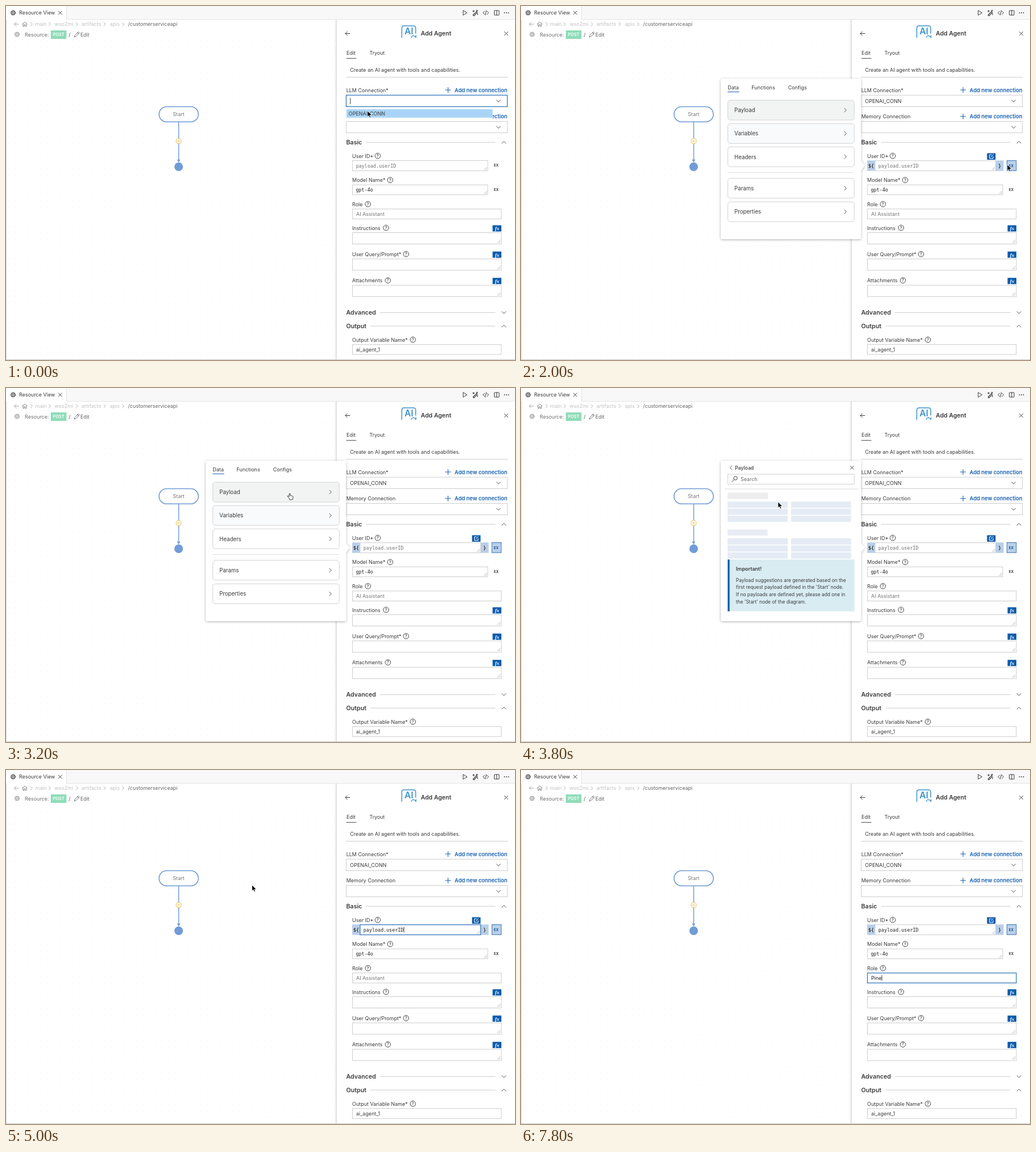
An HTML page for the animation above (8 s loop, 897 by 624 pixels).

```html
<!DOCTYPE html>
<html lang="en">
<head>
<meta charset="utf-8">
<title>Add Agent</title>
<style>
  html, body { margin: 0; width: 100%; height: 100%; overflow: hidden; background: #fff; }
  svg { display: block; width: 100%; height: 100%; }
  text { font-family: Inter, "Open Sans", sans-serif; white-space: pre; }
  .mono { font-family: "DejaVu Sans Mono", monospace; }
  .serif { font-family: "Liberation Serif", serif; font-style: italic; }
</style>
</head>
<body>
<svg id="stage" viewBox="0 0 897 624"></svg>
<script>
const LOOP = 8000, STEP = 200;
const INK = '#3b3b3b', BLUE = '#1560b0', FOCUS = '#3679bd', EDGE = '#cdcdcd', FLOW = '#719cd6';

// ---- drawing helpers: each returns markup ----
const text = (x, y, s, { size = 9, fill = INK, weight = 400, anchor = 'start', cls = '' } = {}) =>
  `<text x="${x}" y="${y}" font-size="${size}" fill="${fill}" font-weight="${weight}" text-anchor="${anchor}" class="${cls}">${s}</text>`;
const mono = (x, y, s, o = {}) => text(x, y, s, { size: 8.42, cls: 'mono', ...o });
const box = (x, y, x2, y2, fill = '#fff', stroke = 'none', r = 0, w = 1) =>
  `<rect x="${x}" y="${y}" width="${x2 - x}" height="${y2 - y}" rx="${r}" fill="${fill}" stroke="${stroke}" stroke-width="${w}"/>`;
const path = (d, stroke = INK, w = 1, fill = 'none') =>
  `<path d="${d}" stroke="${stroke}" stroke-width="${w}" fill="${fill}" stroke-linecap="round" stroke-linejoin="round"/>`;
const circle = (x, y, r, fill = 'none', stroke = INK, w = 1) =>
  `<circle cx="${x}" cy="${y}" r="${r}" fill="${fill}" stroke="${stroke}" stroke-width="${w}"/>`;
const hline = (x, x2, y, c = EDGE) => path(`M${x} ${y}H${x2}`, c);
const group = (id, body) => `<g id="${id}">${body}</g>`;

const TURN = { down: 0, left: 90, up: 180, right: 270 };
const chevron = (x, y, dir, s = 3.5, c = '#444') =>
  `<g transform="translate(${x} ${y}) rotate(${TURN[dir]})">${path(`M${-s} ${-s / 2}L0 ${s / 2}L${s} ${-s / 2}`, c, .95)}</g>`;
const cross = (x, y, s = 3, c = INK) =>
  path(`M${x - s} ${y - s}l${2 * s} ${2 * s}m0 ${-2 * s}l${-2 * s} ${2 * s}`, c, 1);
const backArrow = (x, y, c) => path(`M${x + 4} ${y}h-8m3.5 -3.5l-3.5 3.5l3.5 3.5`, c);
const gear = (x, y, c) =>
  `<circle cx="${x}" cy="${y}" r="3.8" fill="none" stroke="${c}" stroke-width="1.3" stroke-dasharray="1.8 .6"/>` +
  circle(x, y, 2.9, 'none', c, .8) + circle(x, y, 1.2, 'none', c, .9);
const pencil = (x, y, c) => path(`M${x - 4} ${y + 4}l1 -3l6 -6l2 2l-6 6zm5.5 -7.5l2 2`, c, .9);
const help = (x, y) => circle(x, y, 4.8, 'none', INK, .95) +
  text(x, y + 2.7, '?', { size: 7.5, weight: 500, anchor: 'middle' });
const grip = (x, y) => path(`M${x - 6} ${y - 1.5}l5 -5m-2 5l2 -2`, '#999', .7);
const label = (y, s, hx) => text(610, y + 3.5, s) + help(hx, y);
const exMark = (y, c = INK) => text(864, y, 'EX', { size: 6.2, weight: 700, anchor: 'middle', fill: c });
const addLink = y => path(`M774.5 ${y}h9m-4.5 -4.5v9`, BLUE, 1.1) +
  text(883.5, y + 3.5, 'Add new connection', { size: 9.4, weight: 600, fill: BLUE, anchor: 'end' });
const section = (y, s, x, dir) => text(599.5, y + 4, s, { size: 10.7, weight: 600 }) +
  hline(x, 862, y) + chevron(877.5, y, dir);
const exprField = (y, s, hx) => label(y, s, hx) +
  box(857.5, y - 4.5, 873, y + 6.5, '#0b5cad') +
  text(865.5, y + 4.2, 'fx', { size: 9, fill: '#fff', weight: 700, anchor: 'middle', cls: 'serif' }) +
  box(610.5, y + 8.5, 873, y + 28.5, '#fff', EDGE) + grip(872, y + 28);
const caret = (id, x, y) => group(id, path(`M${x} ${y - 4.5}v9`, '#222', .9));

// ---- static parts ----
function canvas() {
  const crumbs = [[51.5, 'main'], [85.5, 'wso2mi'], [133, 'artifacts'], [183, 'apis']];
  return `<defs>
    <pattern id="dots" width="11.25" height="11.25" patternUnits="userSpaceOnUse"><circle cx="5" cy="5" r=".6" fill="#e9e9e9"/></pattern>
    <linearGradient id="edge"><stop stop-color="#fff" stop-opacity="0"/><stop offset="1" stop-color="#d8d8d8"/></linearGradient>
    <filter id="shade" x="-10%" y="-10%" width="120%" height="125%"><feDropShadow dx="0" dy="1" stdDeviation="2.2" flood-opacity=".32"/></filter>
  </defs>` +
  box(0, 0, 897, 624) + box(0, 58, 582, 623, 'url(#dots)') +
  box(106, 0, 897, 23.5, '#f8f8f8') + path('M106.5 0V23.5H897', '#e4e4e4') +
  gear(12.5, 12, INK) + text(23, 15.3, 'Resource View') + cross(95.5, 12) +
  path('M806 8l6.5 4l-6.5 4z') +
  path('M823 16l6 -6l1.5 1.5l-6 6zM824 7.5v3m-1.5 -1.5h3M830 7v2.5m-1.2 -1.2h2.5M831 13v2.4', INK, 1.1) +
  path('M843.5 9l-3 3l3 3m4 -6l3 3l-3 3m-1 -7l-2 8') +
  box(860.5, 8, 869, 16, 'none', INK, .5) + path('M864.8 8v8') +
  [878.5, 882, 885.5].map(x => circle(x, 12, .9, INK, 'none')).join('') +
  backArrow(18.5, 32, '#aaa') + path('M28.5 32l4.5 -4l4.5 4m-7.5 -1v5h2v-3h2v3h2v-5', '#888') +
  [45, 77, 125, 174, 206.5].map(x => chevron(x, 32, 'right', 3, '#aaa')).join('') +
  crumbs.map(([x, s]) => text(x, 35, s, { fill: '#c2c2c2' })).join('') +
  text(215, 35, '/customerserviceapi', { fill: '#666' }) +
  gear(19.5, 50, '#999') + text(33, 54, 'Resource:', { fill: '#707070' }) +
  box(79, 43, 106.5, 58, '#8fdcb9') + text(92.8, 53.3, 'POST', { size: 7.4, weight: 600, fill: '#fff', anchor: 'middle' }) +
  text(110.5, 54, '/', { fill: '#555' }) + pencil(124.5, 50.5, '#666') + text(131, 54, 'Edit', { fill: '#666' }) +
  path('M304.4 205V272', FLOW, 1.5) + path('M302.2 271h4.4l-2.2 4z', FLOW, .8, FLOW) +
  box(269.7, 177.5, 339, 204.3, '#fff', FLOW, 13.4, 1.6) +
  text(304.3, 194, 'Start', { size: 9.1, fill: '#777', anchor: 'middle' }) +
  circle(304.4, 238, 4.6, '#fffdf4', '#e5c566', 1.1) + path('M302 238h4.8m-2.4 -2.4v4.8', '#e5c566', .8) +
  circle(304.3, 283.4, 7.6, FLOW, 'none');
}

function panel() {
  const icon = '#3a93cf';
  return box(577, 24, 583, 623, 'url(#edge)') + box(583, 24, 897, 623) +
  backArrow(602, 48.5, INK) + cross(881.5, 48.5) +
  path('M697.5 55.5V39q0 -4 4 -4H718q4 0 4 4V48', icon, 1.5) +
  text(710, 49.8, 'AI', { size: 15.5, weight: 600, fill: icon, anchor: 'middle' }) +
  path('M714.5 55.5v-1q2 -3.5 5.5 -1.5l2.5 2.5v-3.5', icon, 1.3) +
  text(731, 52.3, 'Add Agent', { size: 10.5, weight: 600 }) +
  text(600, 85.8, 'Edit') + text(640.5, 85.8, 'Tryout', { size: 8.8 }) + path('M600 92.3h17', '#444') +
  text(606.3, 116.2, 'Create an AI agent with tools and capabilities.') + hline(599.5, 884, 125.5) +
  text(599.7, 151.5, 'LLM Connection*') + addLink(148) +
  `<rect id="llm" x="599.5" y="157.2" width="284" height="20.2" fill="#fff"/>` + chevron(868, 167.5, 'down') +
  text(599.7, 198.2, 'Memory Connection') + addLink(194.7) +
  box(599.5, 203.5, 883.5, 223.5, '#fff', EDGE) + chevron(868, 213.8, 'down') +
  group('llmValue', text(606.3, 170.7, 'OPENAI_CONN')) +
  group('dropdown', path('M606.8 162.5v10', '#222', .9) + box(599, 180, 857.5, 203) +
    box(600, 182, 857.5, 196.8, '#a9d4f7') + text(603.8, 192.8, 'OPENAI_CONN')) +
  section(240.3, 'Basic', 635, 'up') +
  label(264.2, 'User ID*', 655) +
  group('plainUser', box(610.5, 272.5, 849, 290.5, '#fff', EDGE) + grip(848.5, 290.5) +
    mono(616.7, 284.6, 'payload.userID', { fill: '#707070' }) + exMark(283.3)) +
  group('exprUser', box(610, 272.3, 624, 290.7, '#b9cfe8') + box(836.5, 272.3, 850.5, 290.7, '#b9cfe8') +
    mono(612, 284.6, '${', { weight: 700 }) + mono(841, 284.6, '}', { weight: 700 }) +
    `<rect id="userBox" x="624" y="272.7" width="212.5" height="17.8" fill="#fff"/>` + grip(836, 290.5) +
    mono(629.8, 284.6, 'payload.userID', { fill: '#222' }).replace('<text', '<text id="userText"') +
    caret('userCaret', 701.3, 281.5) +
    box(856.3, 272.5, 872.8, 290.2, '#b9d0ea', '#3a74b5') + exMark(283.5, '#1c4f86') +
    box(821.3, 259.5, 836.3, 271, '#0b5cad', 'none', .8) +
    path('M829 262.2h-3.5v6.5h6.5v-3.5M828 266.2l4.3 -4.5', '#fff', 1)) +
  label(306.8, 'Model Name*', 677) + box(610.5, 315.3, 849, 332.7, '#fff', EDGE) + grip(848.5, 332.7) +
  mono(616.5, 327, 'gpt-4o', { fill: '#222' }) + exMark(325.8) +
  label(349.2, 'Role', 637.8) +
  `<rect id="roleBox" x="610.5" y="357.8" width="262.3" height="17.6" fill="#fff"/>` +
  `<text id="roleText" x="617" y="370" font-size="9"></text>` + caret('roleCaret', 0, 366.5) +
  exprField(391, 'Instructions', 669.7) + exprField(437.3, 'User Query/Prompt*', 705) +
  exprField(483.7, 'Attachments', 673) +
  section(540.4, 'Advanced', 659, 'down') + section(564.2, 'Output', 643, 'up') +
  label(588.2, 'Output Variable Name*', 717) + box(610.5, 596.7, 872.8, 614.3, '#fff', EDGE) +
  text(617, 608.8, 'ai_agent_1') + hline(0, 897, 623.4, '#c8c8c8') + path('M.4 24V623', '#d5d5d5');
}

function helper() {
  const cards = [[166, 'Payload'], [207.2, 'Variables'], [248.3, 'Headers'], [303.8, 'Params'], [345.2, 'Properties']];
  const card = ([y, s], i) =>
    box(364.5, y, 587.3, y + 35, ['#f2f3f3', '#f8fafc'][i] || '#fff', '#d2d2d2', 4.5) +
    text(376, y + 21.2, s, { size: 9.7 }) + chevron(571.7, y + 17.5, 'right', 3.3);
  const bones = y => [0, 12.4, 24.8].map(d =>
    box(364, y + d, 470, y + d + 11) + box(476, y + d, 581.5, y + d + 11)).join('').replaceAll('#fff', '#e5ebf4');
  const note = ['Payload suggestions are generated based on the', "first request payload defined in the 'Start' node.",
    'If no payloads are defined yet, please add one in', "in the 'Start' node of the diagram."];
  note[3] = note[3].slice(3);
  note[3] = 'the ' + note[3].slice(4);
  return `<g filter="url(#shade)">${box(352, 128.3, 599.3, 411, '#fff', 'none', 3)}${path('M599 273l6.5 8.5l-6.5 8.5z', 'none', 0, '#fff')}</g>` +
  group('menu', text(364.3, 146.7, 'Data') + text(406.3, 146.7, 'Functions') + text(470.7, 146.7, 'Configs') +
    path('M364.5 151.4h19.5', BLUE) + cards.map(card).join('') + hline(364, 587, 293.5, '#e0e0e0')) +
  group('payload', chevron(370, 140.5, 'left', 3.4) + text(377, 143.8, 'Payload', { size: 8.7, weight: 500 }) +
    cross(583.3, 140.5, 2.9) + box(364.5, 152, 587.3, 169.5, '#fff', '#d2d2d2') +
    circle(378, 159, 3.2, 'none', '#444') + path('M375.7 161.5l-4 4', '#444') +
    text(387, 164.2, 'Search', { size: 8.9, fill: '#666' }) + hline(359, 594, 178, '#dadada') +
    group('bones', box(364, 184.5, 435, 195.7, '#ededed') + bones(200.2) + box(364, 249.3, 434.5, 260.2, '#e8ecf4') + bones(264.9)) +
    box(364.3, 302.3, 587.5, 393.6, '#d8ecf2') + box(364.3, 302.3, 367.6, 393.6, '#0b5cad') +
    text(378.8, 321.8, 'Important!', { weight: 600 }) +
    note.map((s, i) => text(378.8, 341.6 + i * 12.65, s, { size: 8.4 })).join(''));
}

function suggest() {
  const key = (x, x2) => box(x, 321.3, x2, 334, '#fff', '#dcdcdc', 1.5, .8);
  const small = { size: 8.3 }, cap = { size: 6.9, weight: 700 };
  return `<g filter="url(#shade)">${box(623.7, 296, 870, 339.5, '#fff', 'none', 2)}</g>` +
  box(624, 298.5, 869.5, 315, '#f6f6f6') + hline(624, 869.5, 317.5, '#e2e2e2') +
  box(630, 305, 636, 310.5, 'none', '#555', .5, .8) + box(633.5, 302.5, 639, 308, '#f6f6f6', '#555', .5, .8) +
  path('M631.5 307.7h3', '#555', .8) +
  mono(644.7, 309.8, 'userID', { size: 8.9, weight: 700 }) +
  key(629, 641.5) + key(650, 662.3) + key(717.5, 746.3) + key(791, 810.8) +
  path('M635.3 330.5v-5.5m-1.6 1.6l1.6 -1.6l1.6 1.6M656.2 325v5.5m-1.6 -1.6l1.6 1.6l1.6 -1.6', '#333', .9) +
  text(644.5, 330.7, ',', small) + text(665.7, 330.7, 'to navigate.', small) + text(720, 330.2, 'ENTER', cap) +
  text(748.7, 330.7, 'to select.', small) + text(793.7, 330.2, 'ESC', cap) + text(813.8, 330.7, 'to cancel.', small) +
  box(861.5, 290.8, 871, 300, '#fff') + cross(866.3, 295.3, 2.6);
}

const pointers = group('arrow', path('M0 0V10.2L2.4 8L4 11.8L5.8 11L4.2 7.4H7.4Z', '#fff', .7, '#000')) +
  group('hand', path('M-1.2 8.2L-4 4.8q.2 -1.4 1.8 -.4L-1 5.6V.6q1 -1.2 2 0V4q1.2 -.8 1.8 .2q1.2 -.6 1.7 .4q1.3 -.2 1.3 1V8L4.5 11H.5Z', '#222', .9, '#fff'));

const stage = document.getElementById('stage');
stage.innerHTML = canvas() + panel() + group('helper', helper()) + group('suggest', suggest()) + pointers;

// ---- motion ----
const el = id => document.getElementById(id);
const ids = ['llm', 'llmValue', 'dropdown', 'plainUser', 'exprUser', 'userBox', 'userText', 'userCaret', 'roleBox',
  'roleText', 'roleCaret', 'helper', 'menu', 'payload', 'bones', 'suggest', 'arrow', 'hand'];
const ui = Object.fromEntries(ids.map(id => [id, el(id)]));

// pointer stops: time, x, y
const route = [[0, 637, 185], [200, 638, 186], [1200, 886, 263], [1600, 864, 278], [2000, 857, 280], [2200, 849, 279],
  [2400, 849, 279], [2600, 770, 250], [3000, 501, 185], [3200, 500, 186], [3800, 453, 201], [5000, 433.5, 203],
  [5200, 450, 225], [6000, 660, 376], [6400, 652, 367], [6600, 650, 368], [7000, 650, 368], [7200, 579, 382], [LOOP, 579, 382]];

function pointerAt(t) {
  const i = route.findIndex(k => k[0] > t), [t0, x0, y0] = route[i - 1], [t1, x1, y1] = route[i];
  const p = (t - t0) / (t1 - t0);
  return [x0 + (x1 - x0) * p, y0 + (y1 - y0) * p];
}

const show = (name, on) => ui[name].setAttribute('display', on ? 'inline' : 'none');
function focus(name, on) {
  ui[name].setAttribute('stroke', on ? FOCUS : EDGE);
  ui[name].setAttribute('stroke-width', on ? 1.3 : 1);
}

function render(time) {
  const t = Math.floor(time / STEP) * STEP;
  const within = (a, b = LOOP) => t >= a && t < b;

  show('dropdown', !within(400));
  show('llmValue', within(400));
  focus('llm', !within(1800));

  show('plainUser', !within(1800));
  show('exprUser', within(1800));
  const editing = within(5000, 6400);
  focus('userBox', editing);
  show('userCaret', editing);
  ui.userText.setAttribute('fill', within(5000) ? '#222' : '#707070');

  show('helper', within(2000, 5000));
  show('menu', !within(3400));
  show('payload', within(3400));
  ui.bones.setAttribute('opacity', .85 + .15 * Math.cos((t - 3800) / 1500 * 2 * Math.PI));
  show('suggest', within(5400, 6400));

  const typed = 'Pine'.slice(0, Math.max(0, (t - 7000) / STEP));
  ui.roleText.textContent = typed || 'AI Assistant';
  ui.roleText.setAttribute('fill', typed ? '#222' : '#777');
  focus('roleBox', within(6400));
  show('roleCaret', within(6400));
  const end = typed ? ui.roleText.getComputedTextLength() + .5 : 0;
  ui.roleCaret.setAttribute('transform', `translate(${617 + end} 0)`);

  const [x, y] = pointerAt(t);
  const overButton = within(1600, 2000) || within(3000, 3400);
  for (const name of ['arrow', 'hand']) ui[name].setAttribute('transform', `translate(${x} ${y})`);
  show('hand', overButton);
  show('arrow', !overButton && !within(7400));
}

const start = performance.now();
function tick(now) {
  render(Math.max(0, now - start) % LOOP);
  requestAnimationFrame(tick);
}
render(0);
requestAnimationFrame(tick);
</script>
</body>
</html>
```
